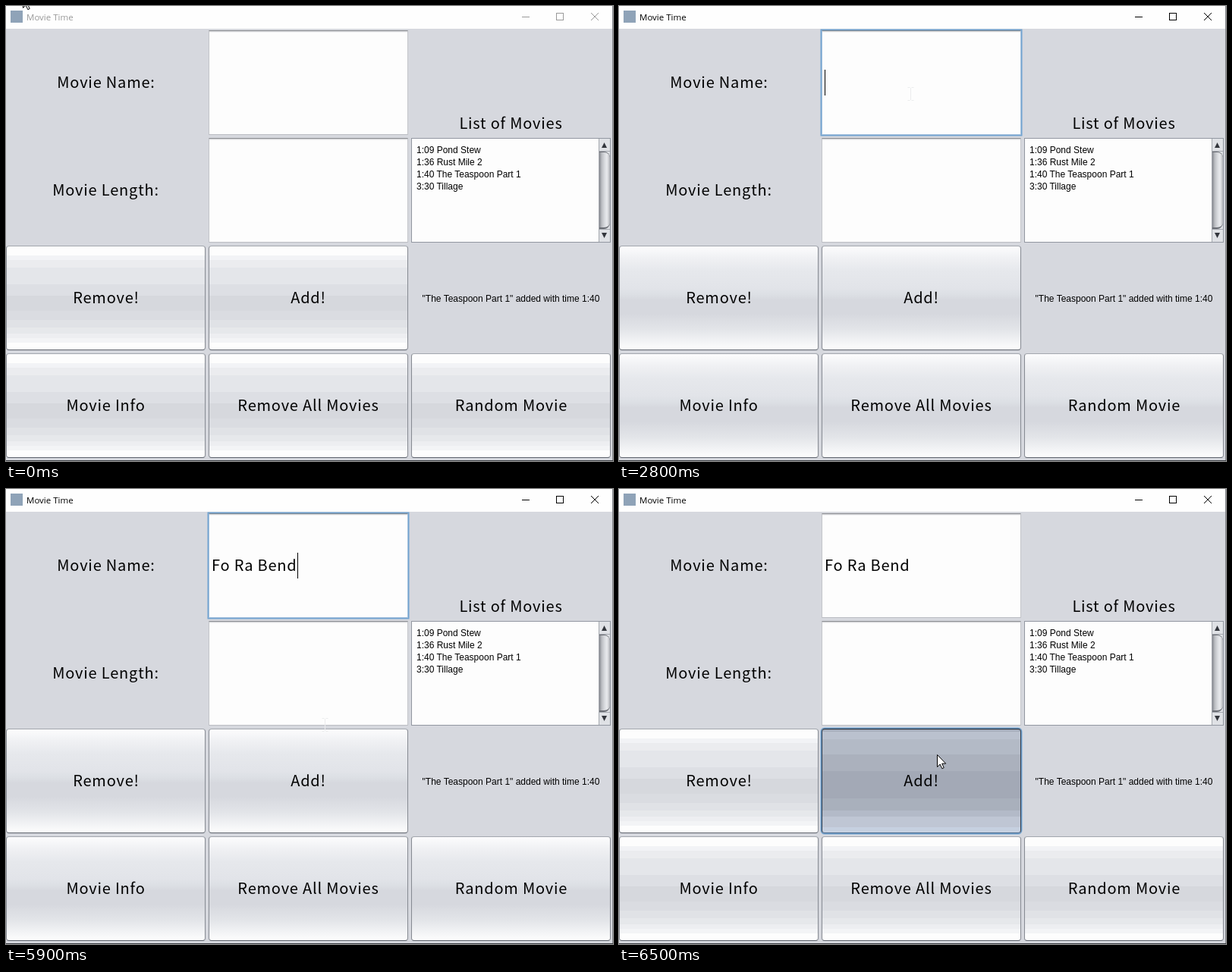
Recreate the animation shown at these times as an HTML page. Size 800 by 600 pixels, loop 8 s.

```html
<!DOCTYPE html>
<html lang="en">
<head>
<meta charset="utf-8">
<title>Movie Time</title>
<style>
  html, body { margin: 0; width: 100%; height: 100%; overflow: hidden; }
  #app {
    position: relative; width: 800px; height: 600px; overflow: hidden;
    background: #d6d8de;
    --face: linear-gradient(#fdfdfd 12px, #f2f3f6 0 18px, #ebecef 0 28px, #e4e6ea 0 50px,
      #dddfe4 0 65px, #d6d8dd 0 85px, #dadce1 0 97px, #e0e2e6 0 107px, #e6e8eb 0 115px,
      #edeef1 0 121px, #f3f4f6 0 127px, #fdfdfd 0);
    --ink: #999;
  }
  #app.active { --ink: #000; }
  #app.smooth {
    --face: linear-gradient(#fcfcfd, #eff0f3 12%, #e6e8ec 24%, #e2e4e9 40%, #dcdfe4 47%,
      #d6d8de 52%, #d6d8de 65%, #e2e4e8 80%, #f2f3f5 92%, #fdfdfd);
  }
  #app > * { position: absolute; box-sizing: border-box; }
  .bar { left: 0; top: 0; width: 800px; height: 30px; background: #fefefe; }
  .edge-r { left: 799px; top: 0; width: 1px; height: 600px; background: #85878c; }
  .edge-b { left: 0; top: 599px; width: 800px; height: 1px; background: #3a3d42; }

  .field, .btn { width: 263px; height: 138px; }
  .c1 { left: 0; } .c2 { left: 267px; } .c3 { left: 534px; }
  .r1 { top: 32px; } .r2 { top: 174px; } .r3 { top: 316px; } .r4 { top: 458px; }

  .field {
    background: linear-gradient(#d3d4d7 1px, #f1f1f2 0 2px, #fdfdfd 0);
    border: 1px solid; border-color: #8d8f94 #c3c5ca #bcbec4;
  }
  .focus .name { box-shadow: 0 0 0 1.5px #73a4d1; border-color: #7b8792 #a5c1dc #a5c1dc; }

  .btn {
    background: var(--face); border: 1px solid; border-radius: 4px;
    border-color: #a3a7ae #868a92 #5c616b;
  }
  .hover .add {
    background: linear-gradient(#fdfdfd 41px, #f1f3f6 0 64px, #e8ecf0 0 108px, #fcfcfd 0);
    border-color: #7b8490 #586270 #2f3846;
  }
  .press .add {
    background: linear-gradient(#a6adbb 3px, #bac1ce 0 13px, #b3bac6 0 33px, #abb1bd 0 55px,
      #a3a9b6 0 91px, #a9b0bc 0 107px, #b3bac8 0 115px, #bfc6d4 0 129px, #c6d0e0 0);
    border-color: #18202c #2c3a4c #45668a;
    box-shadow: 0 0 0 1.5px #73a4d1;
  }

  .list { left: 534px; top: 174px; width: 263px; height: 138px; background: #fdfdfd; border: 1px solid #9297a1; }
  .track { left: 781px; top: 175px; width: 15px; height: 136px; background: #dfe1e5; border-left: 1px solid #a4a7ae; }
  .thumb {
    left: 782px; top: 192px; width: 14px; height: 102px; border-radius: 0 8px 8px 0;
    background: linear-gradient(90deg, #85888e, #b9bbc0 3px, #d9dbdf 7px, #e9eaed 10px, #b4b6bb);
    border: solid #6a6d74; border-width: 1px 0 2px;
  }

  svg { left: 0; top: 0; }
  text { white-space: pre; }
  .big { font: 20px "Noto Sans CJK JP", "Noto Sans CJK SC", "Noto Sans CJK", sans-serif; letter-spacing: .8px; }
  .mid { text-anchor: middle; }
  .small { font: 12px "Liberation Sans", Arial, sans-serif; }
  .caption { font: 11.5px "Open Sans", "Noto Sans", sans-serif; fill: var(--ink); }
  .ctl { fill: none; stroke: var(--ink); }
</style>
</head>
<body>
<div id="app">
  <div class="bar"></div>
  <div class="field name c2 r1"></div>
  <div class="field c2 r2"></div>
  <div class="list"></div>
  <div class="track"></div>
  <div class="thumb"></div>
  <div class="btn c1 r3"></div>
  <div class="btn add c2 r3"></div>
  <div class="btn c1 r4"></div>
  <div class="btn c2 r4"></div>
  <div class="btn c3 r4"></div>
  <div class="edge-r"></div>
  <div class="edge-b"></div>

  <svg width="800" height="600" viewBox="0 0 800 600">
    <rect x="6" y="6" width="16" height="16" fill="#8fa3b8"/>
    <text class="caption" x="27" y="19">Movie Time</text>
    <g class="ctl">
      <path d="M680 14.5h10M725.5 9.5h9v9h-9z" shape-rendering="crispEdges"/>
      <path d="M771 9l10 10M781 9l-10 10"/>
    </g>

    <g class="big mid">
      <text x="132" y="108">Movie Name:</text>
      <text x="131.5" y="250">Movie Length:</text>
      <text x="665.5" y="162">List of Movies</text>
      <text x="132" y="392">Remove!</text>
      <text x="398.5" y="392">Add!</text>
      <text x="131.5" y="534">Movie Info</text>
      <text x="398.5" y="534">Remove All Movies</text>
      <text x="666" y="534">Random Movie</text>
    </g>

    <g class="small">
      <text x="541" y="194">1:09 Pond Stew</text>
      <text x="541" y="210">1:36 Rust Mile 2</text>
      <text x="541" y="226">1:40 The Teaspoon Part 1</text>
      <text x="541" y="242">3:30 Tillage</text>
      <text class="mid" x="665.5" y="390">"The Teaspoon Part 1" added with time 1:40</text>
    </g>
    <path d="M781 191.5h15M781 294.5h15" stroke="#a4a7ae"/>
    <path d="M785 187l3.5-7 3.5 7zM785 299l3.5 7 3.5-7z" fill="#33363c"/>

    <text id="typed" class="big" x="271" y="108"></text>
    <rect id="caret" x="271" y="84" width="1" height="34"/>
    <path id="beam" d="M-4 -8.5h3M1 -8.5h3M-4 8.5h3M1 8.5h3M0 -8v16" fill="none" stroke="#ebeced"/>
    <path id="arrow" d="M.5 .5V16.5L4.2 13L6.8 18.7L9.2 17.6L6.7 12.1H11.7Z" fill="#fff" stroke="#000"/>
  </svg>
</div>

<script>
  const LOOP = 8000;
  const TITLE = "Fo Ra Bend";
  // start of each step and the number of letters shown from then on
  const KEYS = [[3700, 1], [3800, 2], [4000, 3], [4100, 4], [4200, 5],
                [4300, 6], [4400, 7], [4600, 8], [4700, 10]];
  const $ = id => document.getElementById(id);
  const app = $("app"), typed = $("typed"), caret = $("caret"), beam = $("beam"), arrow = $("arrow");

  const within = (t, a, b) => t >= a && t < b;
  const show = (el, on) => el.setAttribute("visibility", on ? "visible" : "hidden");
  const place = (el, x, y) => el.setAttribute("transform", `translate(${x} ${y})`);
  const ease = p => p * p * (3 - 2 * p);

  function arrowAt(t) {
    if (t < 1100) {
      const p = ease(Math.max(0, Math.floor(t / 100) - 4) / 6);
      return [Math.round(22 + 235 * p), Math.round(-14 + 101 * p)];
    }
    const left = Math.max(0, 3 - Math.floor((t - 6000) / 100));
    return [419, 350 - 2 * left * left];
  }

  function draw(t) {
    app.classList.toggle("active", t >= 1800);
    app.classList.toggle("smooth", within(t, 1800, 6000));
    app.classList.toggle("focus", within(t, 1800, 6500));
    app.classList.toggle("hover", within(t, 6000, 6500));
    app.classList.toggle("press", t >= 6500);

    // each key press restarts the caret's blink
    let count = 0, since = 1800;
    for (const [at, n] of KEYS) if (t >= at) { count = n; since = at; }
    const text = TITLE.slice(0, count);
    if (typed.textContent !== text) typed.textContent = text;
    const width = count ? typed.getComputedTextLength() : 0;
    caret.setAttribute("x", 271 + Math.round(width));
    show(caret, within(t, 1800, 6500) && Math.floor((t - since) / 500) % 2 === 0);

    show(beam, within(t, 1800, 6000));
    if (t < 5900) place(beam, 384.5, 116);
    else place(beam, 420.5, 311);

    show(arrow, t < 1100 || t >= 6000);
    place(arrow, ...arrowAt(t));
  }

  const start = performance.now();
  function tick() {
    draw((performance.now() - start) % LOOP);
    requestAnimationFrame(tick);
  }
  tick();
</script>
</body>
</html>
```
